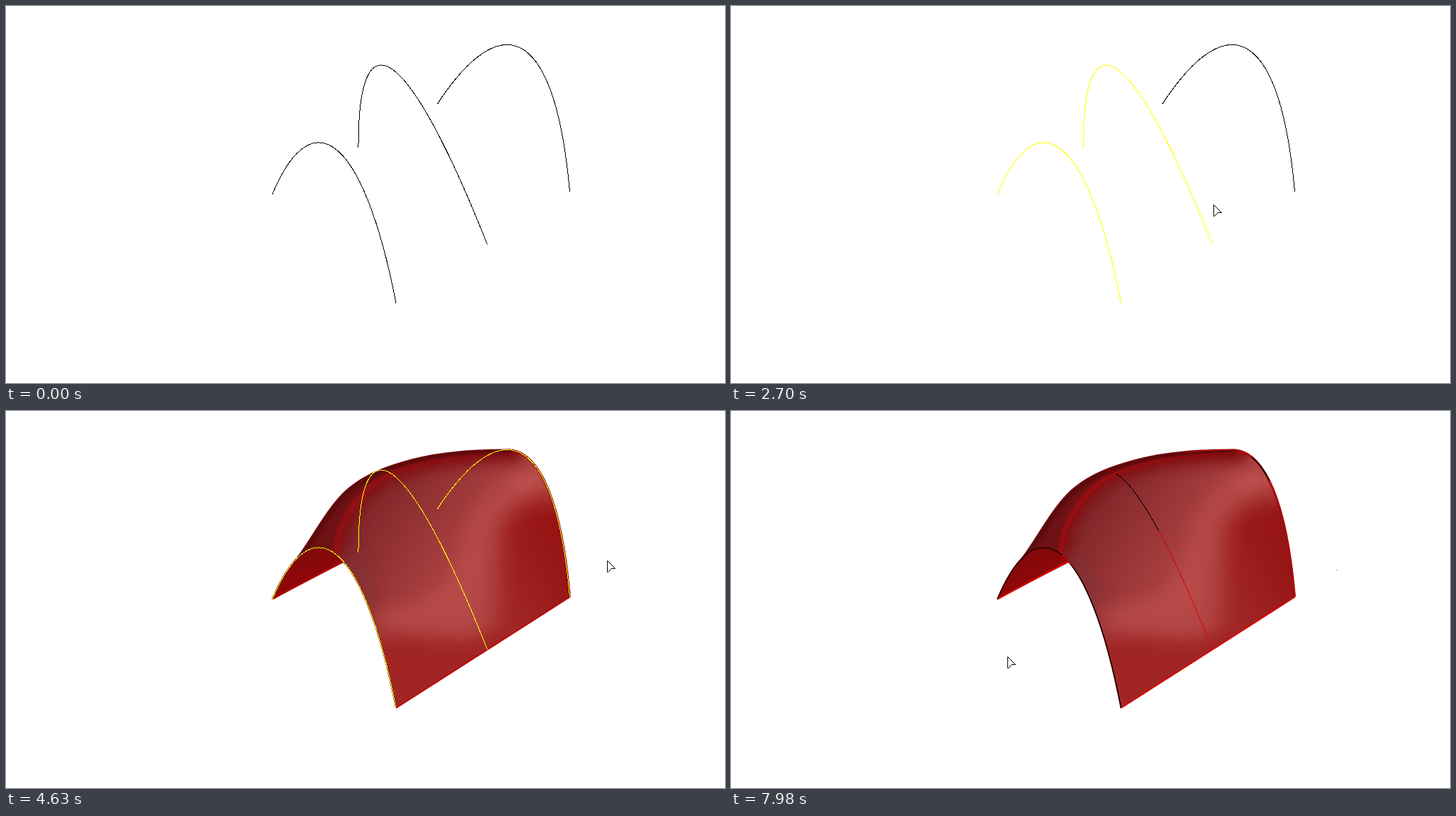
These frames come from a looping animation (1012x530 px, 8 s). An HTML page:

```html
<!DOCTYPE html>
<html lang="en">
<head>
<meta charset="utf-8">
<title>Loft surface</title>
<style>
  html, body { margin: 0; width: 100%; height: 100%; overflow: hidden; background: #fff; }
  svg { display: block; width: 1012px; height: 530px; }
  .line { fill: none; stroke-width: 1; shape-rendering: crispEdges; }
  .edge { fill: none; stroke-width: 2; }
  .soft { fill: none; }
</style>
</head>
<body>
<svg viewBox="0 0 1012 530">
  <defs>
    <path id="c1" pathLength="100" d="M375 264.5C431 130.9 503 181.9 549 417.5"/>
    <path id="c2" pathLength="100" d="M496 198.5C495.3 7.6 565.8 53.3 677.5 335.5"/>
    <path id="c3" pathLength="100" d="M607 138C701 -5.3 774 35.8 793.5 261.5"/>
    <path id="ridge" d="M464 203C464 162 493 110 543 87C590 66 650 61 726 58"/>
    <path id="crest" d="M410 207C432 178 450 140 478 113C505 88 540 77 572 68.5C615 57 660 55 711 54.5"/>
    <clipPath id="body">
      <path d="M410 207C432 178 450 140 478 113C505 88 540 77 572 68.5C615 57 660 55 711 54.5C752.6 60.6 782 129.5 793.5 261.5L549 417.5C512.2 229 458.8 158.7 410 207Z"/>
    </clipPath>
    <linearGradient id="base" gradientUnits="userSpaceOnUse" x1="500" y1="150" x2="650" y2="250">
      <stop offset="0" stop-color="#82272a"/>
      <stop offset=".4" stop-color="#963335"/>
      <stop offset="1" stop-color="#b34846"/>
    </linearGradient>
    <linearGradient id="under" gradientUnits="userSpaceOnUse" x1="420" y1="195" x2="432" y2="236">
      <stop offset="0" stop-color="#800a0c"/>
      <stop offset="1" stop-color="#900608"/>
    </linearGradient>
    <linearGradient id="side" gradientUnits="userSpaceOnUse" x1="690" y1="260" x2="785" y2="210">
      <stop offset="0" stop-color="#a22828"/>
      <stop offset="1" stop-color="#961414"/>
    </linearGradient>
  </defs>

  <g id="surface">
    <path fill="url(#under)" d="M375 264.5C406.1 190.4 442.1 173.1 475.8 212.7Z"/>
    <g clip-path="url(#body)">
      <rect x="370" y="50" width="430" height="370" fill="url(#base)"/>
      <path class="soft" stroke="#b84b49" stroke-width="32" style="filter:blur(14px)" d="M530 296C600 292 640 265 655 220C668 170 672 115 760 95"/>
      <path fill="url(#side)" style="filter:blur(15px)" d="M694 175Q699 134 755 124L830 116V290L680 370Q690 280 694 175Z"/>
      <path fill="#a02424" style="filter:blur(12px)" d="M515 318Q590 316 640 322L700 308L730 330L540 445Z"/>
      <path class="soft" stroke="#7d3538" stroke-width="18" opacity=".6" style="filter:blur(10px)" d="M480 200Q502 228 515 268"/>
      <ellipse cx="730" cy="100" rx="24" ry="8" transform="rotate(-18 730 100)" fill="#c25654" opacity=".7" style="filter:blur(8px)"/>
      <use href="#ridge" class="soft" stroke="#801013" stroke-width="26" style="filter:blur(9px)"/>
      <path fill="#6f1215" style="filter:blur(2px)" d="M400 215L410 207C432 178 450 140 478 113C505 88 540 77 572 68.5C615 57 660 55 711 54.5L726 58C650 61 590 66 543 87C493 110 464 162 464 203Q440 180 400 215Z"/>
      <use href="#ridge" class="soft" stroke="#9c0f14" stroke-width="6" style="filter:blur(2.5px)"/>
      <use href="#crest" class="soft" stroke="#4c080a" stroke-width="9" style="filter:blur(3.5px)"/>
    </g>
    <g class="edge" stroke="#6a0a0c">
      <use href="#crest" stroke-width="2.5"/>
      <use href="#c1"/>
      <use href="#c3" stroke="#8c0a0c" stroke-width="3" stroke-dasharray="0 37.5 100"/>
    </g>
    <path id="ground" class="edge" d="M375 264.5L475 211M549 417.5L793.5 261.5"/>
  </g>

  <g id="isos" class="line">
    <use href="#ridge" stroke="#b4080e" opacity=".75"/>
    <g stroke="#dc0000">
      <use href="#c2" stroke-dasharray="0 30 100"/>
      <use href="#c3" stroke-dasharray="0 37.5 100"/>
      <path d="M640 57.5Q680 54.5 711 54.5"/>
    </g>
    <g stroke="#000">
      <use href="#c1"/>
      <use href="#c2" stroke-dasharray="0 33.5 23.5 100"/>
      <use href="#c3" stroke-dasharray="0 44 11 100"/>
    </g>
    <use href="#c1" stroke="#dc0000" stroke-dasharray="0 36 5 100"/>
  </g>

  <g id="profiles" class="line">
    <use href="#c1"/>
    <use href="#c2"/>
    <use href="#c3"/>
  </g>

  <rect id="speck" x="852" y="223" width="1" height="1" fill="#777"/>
  <g id="cursor" fill="#fff" stroke="#000" stroke-width="1">
    <path id="plain" d="M.5 .5V16.5H1.5L5.5 12.5L6 11.5H11.5Z"/>
    <g id="tailed">
      <path d="M.5 .5V16.5L4.2 13L6.6 18.5L9 17.5L6.6 12.2H11Z"/>
      <path d="M5.2 14.5L6.6 18.5L9 17.5L7.8 14.5" fill="#d88" stroke="#7a1515"/>
    </g>
  </g>
</svg>
<script>
const LOOP = 8000;
const PICKED = [1700, 2550, 3560];   // when each profile is selected
const LOFT = 4630, DONE = 5410, TAIL = 5270, LEAVE = 6220, GONE = 6590, BACK = 7750;

// start, end, steps, then from / bend / to of the pointer tip
const MOVES = [
  { t0: 840, t1: 1620, n: 11, enter: true, pts: [[631, 502], [556, 342], [537, 369]] },
  { t0: 1700, t1: 2080, n: 6, pts: [[537, 369], [600, 338], [667, 290]] },
  { t0: 2320, t1: 2473, n: 3, pts: [[667, 290], [661, 289], [655, 287]] },
  { t0: 2700, t1: 3100, n: 6, pts: [[655, 287], [729, 268], [794, 192]] },
  { t0: 3240, t1: 3400, n: 3, pts: [[794, 192], [792, 192], [790, 192]] },
  { t0: 3800, t1: 4260, n: 7, pts: [[790, 192], [820, 195], [846, 210]] },
  { t0: TAIL, t1: TAIL + 1, n: 1, pts: [[846, 210], [846, 211], [846, 211]] },
  { t0: LEAVE, t1: 6516, n: 5, pts: [[846, 211], [600, 190], [225, 132]] },
  { t0: BACK, t1: 7980, n: 4, enter: true, pts: [[83, 284], [300, 365], [389, 345]] }
];

const $ = id => document.getElementById(id);
const show = (el, on) => el.setAttribute("visibility", on ? "visible" : "hidden");
const surface = $("surface"), ground = $("ground"), isos = $("isos");
const profiles = $("profiles"), cursor = $("cursor"), speck = $("speck");
const plain = $("plain"), tailed = $("tailed");

function bend([a, b, c], p) {
  const q = 1 - p;
  return [0, 1].map(i => Math.round(q * q * a[i] + 2 * p * q * b[i] + p * p * c[i]));
}

// The pointer advances in discrete steps, the last one landing on the end point.
function pointer(t) {
  const m = MOVES.filter(move => t >= move.t0).pop();
  if (!m) return null;
  const k = Math.min(m.n - 1, Math.floor((t - m.t0) / (m.t1 - m.t0) * (m.n - 1) + 1e-6));
  return bend(m.pts, m.enter ? k / (m.n - 1) : (k + 1) / m.n);
}

function draw(t) {
  const done = t >= DONE;
  show(surface, t >= LOFT);
  show(isos, done);
  show(profiles, !done);
  ground.setAttribute("stroke", done ? "#de0000" : "#bd0000");
  [...profiles.children].forEach((el, i) =>
    el.setAttribute("stroke", t >= PICKED[i] ? "#ffff00" : "#000"));

  const tip = pointer(t);
  const seen = tip && (t < GONE || t >= BACK);
  const tail = t >= TAIL && t < LEAVE;
  show(plain, seen && !tail);
  show(tailed, seen && tail);
  if (tip) cursor.setAttribute("transform", `translate(${tip[0]} ${tip[1]})`);
  show(speck, t >= LEAVE);
}

const begin = performance.now();
function tick() {
  draw((performance.now() - begin) % LOOP);
  requestAnimationFrame(tick);
}
draw(0);
requestAnimationFrame(tick);
</script>
</body>
</html>
```
